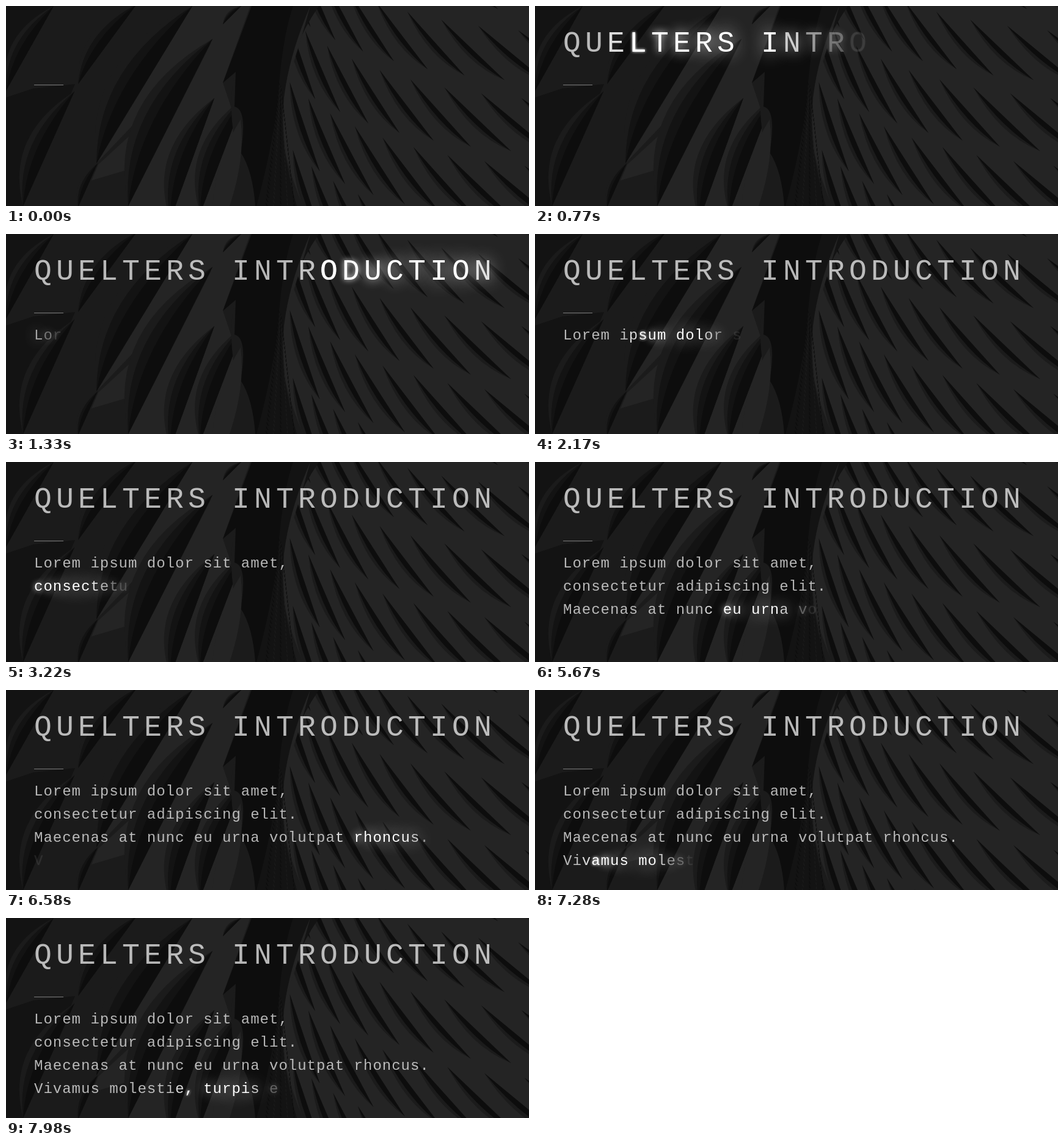
These frames come from a looping animation (856x328 px, 8 s). An HTML page with a canvas:

```html
<!DOCTYPE html>
<html lang="en">
<head>
<meta charset="utf-8">
<title>Glowing letters</title>
<style>
html, body { margin: 0; width: 100%; height: 100%; overflow: hidden; background: #1b1b1b; }
canvas { display: block; }
</style>
</head>
<body>
<canvas id="stage" width="856" height="328"></canvas>
<script>
const W = 856, H = 328, LOOP = 8000, TICK = 70;
const FIRST = 55, STAGGER = 53.8;          // ms
const FADE = 4.4, HOT = 10.8, COOL = 11.8; // letter age, in staggers
const GLOW = 30, LEFT = 46;
const FONT = '"Courier New", Courier, "Liberation Mono", monospace';
const BLACK = '#0d0d0d', DARK = '#131313', MID = '#1b1b1b', LIGHT = '#242424';

const TITLE = 'QUELTERS INTRODUCTION';
const BODY = [
  'Lorem ipsum dolor sit amet, ',
  'consectetur adipiscing elit. ',
  'Maecenas at nunc eu urna volutpat rhoncus. ',
  'Vivamus molestie, turpis e'
];

const ctx = document.getElementById('stage').getContext('2d');
const backdrop = paintBackdrop();

function paintBackdrop() {
  const layer = document.createElement('canvas');
  layer.width = W;
  layer.height = H;
  const g = layer.getContext('2d');
  g.fillStyle = MID;
  g.fillRect(0, 0, W, H);
  paintLeaves(g);
  paintThorns(g);
  paintStem(g);
  g.fillStyle = '#7c7c7c';
  g.fillRect(LEFT, 129, 48, 1);
  return layer;
}

function fill(g, color, path) {
  g.fillStyle = color;
  g.fill(new Path2D(path));
}

// A sliver from tip to tip, bowed to one side of its chord.
function blade(g, color, x, y, dx, dy, outer, inner = 0) {
  const mx = x + dx * 0.55, my = y + dy * 0.55;
  g.fillStyle = color;
  g.beginPath();
  g.moveTo(x, y);
  g.quadraticCurveTo(mx - dy * outer, my + dx * outer, x + dx, y + dy);
  g.quadraticCurveTo(mx - dy * inner, my + dx * inner, x, y);
  g.fill();
}

function paintLeaves(g) {
  fill(g, DARK, 'M0 0H78L0 139Z');
  fill(g, DARK, 'M0 150L45 135L113 128L28 328H0Z');
  fill(g, LIGHT, 'M305 0H400L355 126L380 200L366 328H200L336 60L150 256Z');
  fill(g, LIGHT, 'M140 286L151 260L214 202L194 270Z');
  // tip, then run to the far end
  const shades = [
    [78, 0, -78, 139], [112, 140, -84, 188], [214, -3, -96, 131],
    [305, 0, -157, 258], [338, 54, -138, 274], [341, 151, -72, 200],
    [390, 150, -72, 190], [150, 258, -32, 72], [385, 0, -30, 30]
  ];
  for (const shade of shades) {
    blade(g, MID, ...shade, 0.36);
    blade(g, DARK, ...shade, 0.27);
    blade(g, BLACK, ...shade, 0.17);
  }
}

function paintThorns(g) {
  fill(g, LIGHT, 'M512 0H856V328H486Q454 250 452 206Q448 150 468 92Q480 40 512 0Z');
  for (let row = 0; row < 5; row++) {
    for (let u = -1; u < 9; u++) {
      const x = 480 + 5 * row + 33 * u + 2.5 * u * u;
      const y = 41 + 111 * (row - 2) + 25.5 * u - 1.4 * u * u;
      const scale = 0.85 + 0.05 * Math.min(row, 3);
      const dx = (60 + 11 * u) * scale, dy = (140 - 6 * u) * scale;
      blade(g, MID, x, y, dx, dy, 0.18);
      blade(g, BLACK, x, y, dx, dy, 0.11);
    }
  }
}

function paintStem(g) {
  fill(g, MID, 'M400 0L355 126L374 112Q362 170 378 240L420 0Z');
  fill(g, BLACK, 'M402 0H512Q462 70 454 150Q446 230 472 328H408Q404 270 384 240Q396 170 374 165L376 108L355 126Z');
  fill(g, DARK, 'M470 0H512Q464 70 455 150Q447 230 476 328H410Q436 230 444 160Q452 50 470 0Z');
  fill(g, LIGHT, 'M384 186Q392 250 366 328H338Q344 250 384 186Z');
  blade(g, LIGHT, 498, 0, -40, 130, 0.06, -0.02);
  // rough bark, wider towards the ground
  for (let y = 130; y < H; y += 7) {
    const spread = (y - 110) / 9;
    for (let k = -2; k < 3; k++) {
      blade(g, k % 2 ? MID : BLACK, 449 + k * spread / 2, y + k * 2, 2 - k, 7, 0.4);
    }
  }
}

function drawLetter(char, x, y, age) {
  if (age <= 0) return;
  const cooled = Math.min(1, Math.max(0, (age - HOT) / (COOL - HOT)));
  ctx.globalAlpha = Math.min(1, age / FADE) * (1 - 0.3 * cooled);
  ctx.shadowColor = age < HOT ? '#fff' : 'transparent';
  ctx.shadowBlur = GLOW * Math.sin(Math.PI * Math.min(1, age / HOT));
  ctx.fillText(char, x, y);
}

function drawLine(text, size, step, y, age) {
  ctx.font = size + 'px ' + FONT;
  [...text].forEach((char, i) => drawLetter(char, LEFT + i * step, y, age - i));
  return age - text.length;
}

function draw(time) {
  const t = Math.floor(time % LOOP / TICK) * TICK;
  ctx.drawImage(backdrop, 0, 0);
  if (t < 2 * TICK) return;
  ctx.save();
  ctx.fillStyle = '#fff';
  let age = drawLine(TITLE, 48, 36, 75, (t - FIRST) / STAGGER);
  BODY.forEach((text, i) => {
    age = drawLine(text, 24, 15.4, 173 + 38 * i, age);
  });
  ctx.restore();
}

const start = performance.now();
function frame() {
  draw(performance.now() - start);
  requestAnimationFrame(frame);
}
frame();
</script>
</body>
</html>
```
